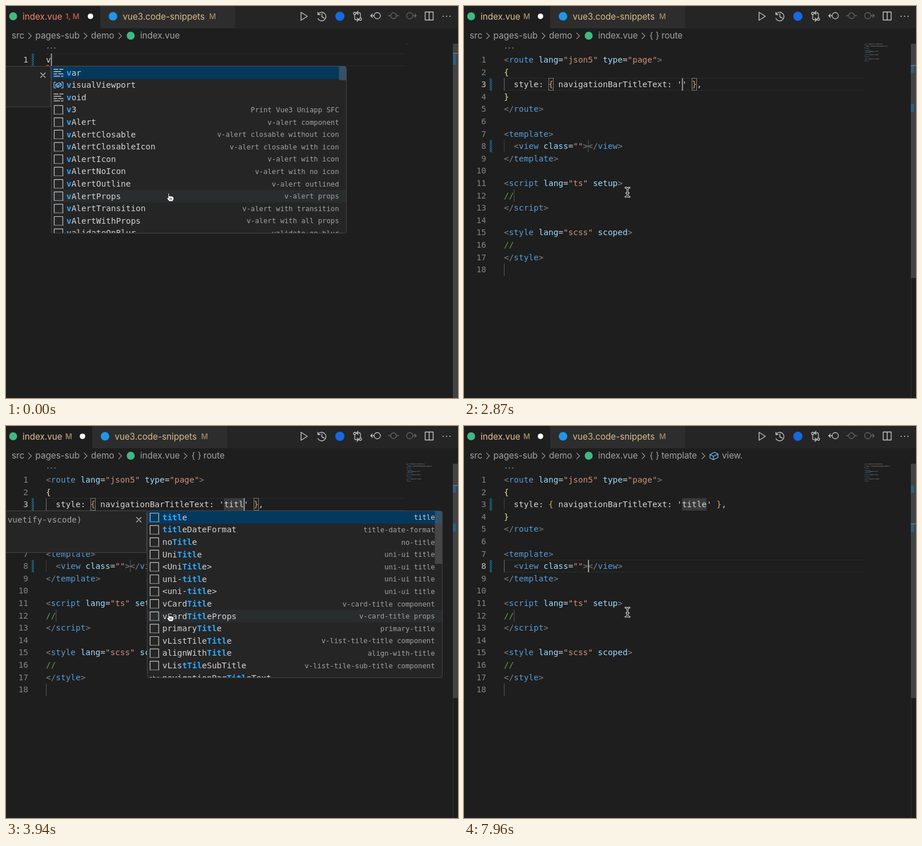
Recreate the animation shown at these times as an HTML page with a canvas. Size 792 px wide and 686 px high, loop 8 s.

```html
<!DOCTYPE html>
<html>
<head>
<meta charset="utf-8">
<style>
html, body { margin: 0; width: 100%; height: 100%; overflow: hidden; background: #1e1e1e; }
canvas { display: block; }
</style>
</head>
<body>
<canvas id="stage" width="792" height="686"></canvas>
<script>
const c = document.getElementById('stage').getContext('2d');
const LOOP = 8000, ROW = 21.6, LEFT = 70, TOP = 83.2;
const MONO = '"DejaVu Sans Mono", "Noto Sans CJK SC", monospace';
const CODE = '14.4px ' + MONO, SMALL = '12.24px ' + MONO;
const UI = '15.2px Inter, sans-serif', BADGE = '500 13px Inter, sans-serif';
const FG = '#d4d4d4', BLUE = '#2aaaff';
c.font = CODE;
const CW = c.measureText('0').width;
const lineTop = n => TOP + (n - 1) * ROW;

// *x* marks the matched letters, | starts the description, a leading #, @ or ~ picks the icon
const LIST_V = ['#*v*ar', '@*v*isualViewport', '#*v*oid', '*v*3|Print Vue3 Uniapp SFC',
  '*v*Alert|v-alert component', '*v*AlertClosable|v-alert closable without icon',
  '*v*AlertClosableIcon|v-alert closable with icon', '*v*AlertIcon|v-alert with icon',
  '*v*AlertNoIcon|v-alert with no icon', '*v*AlertOutline|v-alert outlined',
  '*v*AlertProps|v-alert props', '*v*AlertTransition|v-alert with transition',
  '*v*AlertWithProps|v-alert with all props', '*v*alidateOnBlur|validate-on-blur'];
const UNI = '|uni-app VUE3 平台';
const LIST_V3 = ['*v3*|Print Vue3 Uniapp SFC',
  ...Array(3).fill('*v*ue*3*' + UNI), ...Array(3).fill('platform-*v*ue*3*' + UNI),
  '*v*ListTemplateAvatarWith*3*Lin…|v-list avatar with three lin…'];
const LIST_TI = ['*ti*cks|ticks', '*ti*le|tile', '*ti*meout|timeout', '*ti*tle|title',
  '*ti*tleDateFormat|title-date-format', '*t*otal*I*tems|total-items',
  'v*Ti*mePicker|v-time-picker component', 'v*Ti*mePicker24hFormat|v-time-picker in 24h format',
  'v*Ti*mePickerAllowedTimes|v-time-picker with allowed times …',
  'v*Ti*mePickerColors|v-time-picker with colors option',
  'v*Ti*mePickerInDialog|v-time-picker in dialog', 'v*Ti*mePickerInMenu|v-time-picker in menu',
  'v*Ti*mePickerLandscape|v-time-picker in ladscape mode', 'v*Ti*mePickerProps|v-time-picker props'];
const LIST_TITLE = ['*title*|title', '*title*DateFormat|title-date-format', 'no*Title*|no-title',
  'Uni*Title*|uni-ui title', '<Uni*Title*>|uni-ui title', 'uni-*title*|uni-ui title',
  '<uni-*title*>|uni-ui title', 'vCard*Title*|v-card-title component',
  'vCard*Title*Props|v-card-title props', 'primary*Title*|primary-title',
  'vListTile*Title*|v-list-tile-title component', 'alignWith*Title*|align-with-title',
  'vLis*tTile*SubTitle|v-list-tile-sub-title component', '~navigationBar*Title*Text'];

const BLINK_OFF = [[300, 480], [1020, 1490], [2390, 2870], [4520, 5000], [5520, 6000], [6470, 6950], [7490, 7960]];
const KEYS = [[3410, 't'], [3580, 'ti'], [3700, 'tit'], [3940, 'titl'], [4050, 'title']];

function rect(x, y, w, h, color) { c.fillStyle = color; c.fillRect(x, y, w, h); }
function frame(x, y, w, h, color) { c.strokeStyle = color; c.lineWidth = 1; c.strokeRect(x, y, w, h); }
function disc(x, y, r, color) { c.fillStyle = color; c.beginPath(); c.arc(x, y, r, 0, 7); c.fill(); }
function text(s, x, y, color, font, align = 'left') {
  c.font = font; c.fillStyle = color; c.textAlign = align; c.fillText(s, x, y);
}
function path(d, x, y, color, width = 1.3) {
  c.save(); c.translate(x, y); c.strokeStyle = color; c.lineWidth = width;
  c.lineJoin = c.lineCap = 'round'; c.stroke(new Path2D(d)); c.restore();
}

function topBar(error) {
  rect(0, 0, 792, 39, '#252526');
  const w = error ? 165 : 151, d = w - 165;
  rect(0, 0, w, 39, '#1e1e1e');
  rect(w, 0, 236.5, 39, '#2d2d2d');
  disc(12.5, 18, 7, '#41b883');
  text('index.vue', 29, 23.5, error ? '#f48771' : '#e2c08d', UI);
  text(error ? '1, M' : 'M', 104, 23, error ? '#c25f53' : '#a8916c', BADGE);
  disc(148 + d, 18, 4.8, '#fff');
  disc(187.5 + d, 18, 7.5, '#2196e8');
  text('vue3.code-snippets', 204.5 + d, 23.5, '#dabb8a', UI);
  text('M', 356 + d, 23, '#a08c6c', BADGE);

  const on = '#c5c5c5', dim = '#656565';
  path('M-5-7L6 0L-5 7Z', 522, 18, on, 1.4);
  path('M-7-7V-3H-3M-7-3A7.5 7.5 0 1 1-7 4M0-4V1L4 3', 553.5, 18, on, 1.4);
  disc(585, 18, 8, '#1769e0');
  path('M-5-3V4Q-5 6-3 6H1M-1 3L2 6L-1 9M5 3V-4Q5-6 3-6H-1M1-9L-2-6L1-3M-7-5A2 2 0 1 0-3-5A2 2 0 1 0-7-5M3 5A2 2 0 1 0 7 5A2 2 0 1 0 3 5', 616, 18, on);
  path('M-9 0H-3M-6-3L-9 0L-6 3M-3 0A5.5 5.5 0 1 1 8 0A5.5 5.5 0 1 1-3 0', 648, 17, on);
  path('M-5 0A5 5 0 1 1 5 0A5 5 0 1 1-5 0M-9 0H-5M5 0H9', 679, 17, dim);
  path('M-8 0A5.5 5.5 0 1 1 3 0A5.5 5.5 0 1 1-8 0M3 0H9M6-3L9 0L6 3', 710, 17, dim);
  path('M-7-7H7V7H-7ZM0-7V7', 741.5, 17.5, on, 1.4);
  for (const x of [766, 772, 778]) disc(x, 18, 1.1, on);
}

function breadcrumbs(t) {
  const gray = '#a3a3a3';
  const part = (s, x) => text(s, x, 57.3, gray, UI);
  const sep = x => path('M-2.5-5L2.5 0L-2.5 5', x, 52.3, gray, 1.2);
  part('src', 10); sep(42); part('pages-sub', 51.5); sep(139.5); part('demo', 149); sep(200);
  disc(218.5, 52, 7, '#41b883');
  part('index.vue', 235);
  if (t < 2390) return;
  sep(314.5);
  part('{ }', 325);
  if (t < 6110) return part('route', 346);
  part('template', 346); sep(419.5);
  path('M-7-2L1-6L7-3V3L-1 7L-7 4ZM-7-2L-1 1L7-3M-1 1V7', 438, 52, '#75beff');
  part('view.', 452);
}

// Splits a code line into [text, color] runs
function tokens(s) {
  if (s[0] === '/') return [[s, '#6a9955']];
  if (!s.includes('<')) {
    const brace = s.length > 1 ? '#dfa467' : '#e8dfa2';
    return s.split(/([{}])/).map(p => [p, /[{}]/.test(p) ? brace : FG]);
  }
  let tag = false;
  return s.match(/<\/?|>|"[^"]*"|\w+|=|\s+/g).map(p => {
    let color = '#9cdcfe';
    if (/[<>]/.test(p)) color = '#808080';
    else if (p[0] === '"') color = '#ce9178';
    else if (p === '=') color = FG;
    else if (tag) color = '#569cd6';
    tag = p[0] === '<';
    return [p, color];
  });
}

const codeLines = typed => ['<route lang="json5" type="page">', '{',
  `  style: { navigationBarTitleText: '${typed}' },`, '}', '</route>', '',
  '<template>', '  <view class=""></view>', '</template>', '',
  '<script lang="ts" setup>', '//', '<\/script>', '',
  '<style lang="scss" scoped>', '//', '</style>', ''];

function hatch(n) {
  c.save(); c.beginPath(); c.rect(45, lineTop(n), 4, ROW); c.clip();
  c.strokeStyle = '#1b81a8'; c.lineWidth = 1.3; c.beginPath();
  for (let y = -4; y < 28; y += 3.6) { c.moveTo(44, lineTop(n) + y + 4); c.lineTo(50, lineTop(n) + y - 2); }
  c.stroke(); c.restore();
}

function editor(lines, active, typed, snippet, t) {
  for (const x of [73.5, 79.5, 85.5]) disc(x, 73.5, 1, '#999');
  for (const y of [0, ROW - 0.6]) rect(LEFT, Math.round(lineTop(active) + y), 630, 1, '#2b2b2b');

  if (snippet) {
    rect(LEFT + 36 * CW, lineTop(3), typed.length * CW, ROW, '#3a3a3a');
    for (const n of [3, 8]) rect(LEFT, lineTop(n), 1, ROW, n === active ? '#707070' : '#404040');
    for (const [n, col] of [[8, 17], [12, 2], [18, 0]]) rect(LEFT + col * CW, lineTop(n), 1, ROW, '#575757');
    if (active === 3)
      for (const col of [9, 38 + typed.length]) frame(Math.round(LEFT + col * CW) + .5, 126.5, 8, 21, '#7d7d7d');
  }

  lines.forEach((s, i) => {
    const n = i + 1, y = lineTop(n) + 15.8;
    text(n, 39, y, n === active ? '#c6c6c6' : '#858585', CODE, 'right');
    let x = LEFT;
    for (const [p, color] of snippet ? tokens(s) : [[s, FG]]) {
      text(p, x, y, color, CODE);
      x += p.length * CW;
    }
  });
  for (const n of snippet ? [3, 8] : [1]) hatch(n);

  if (!snippet) {
    let d = 'M0 2';
    for (let x = 3; x <= lines[0].length * CW; x += 3) d += `L${x} ${x % 2 ? 0 : 2}`;
    path(d, LEFT, 103.4, '#f14c4c', 1.1);
  }
  if (!BLINK_OFF.some(([a, b]) => t >= a && t < b)) {
    const col = !snippet ? lines[0].length : active === 8 ? 17 : 36 + typed.length;
    rect(LEFT + col * CW, lineTop(active), 1.7, ROW, '#aeafad');
  }
}

function sideRails(lines, active, snippet) {
  c.globalAlpha = .55;
  lines.forEach((s, i) => {
    let x = 702;
    for (const [p, color] of snippet ? tokens(s) : [[s, FG]])
      for (const ch of p) { if (ch !== ' ') rect(x, 66 + i * 1.87, .8, 1, color); x++; }
  });
  c.globalAlpha = 1;
  rect(783, 66, 1, 620, '#303030');
  rect(783, 66, 9, snippet ? 410 : 620, '#434343');
  const marks = snippet ? [[104, 13], [171, 14]] : [[83, 20]];
  for (const [y, h] of marks) rect(783, y, 5.5, h, '#2d5f80');
  rect(783, active === 8 ? 170.5 : snippet ? 103.5 : 82, 9, 1.5, '#777');
}

function rowIcon(kind, x, y) {
  const color = '#c5c5c5';
  if (kind === '#') path('M-8-6H-1M2-6H8M-8-2H4M-8 2H-3M0 2H8M-8 6H2M5 6H8', x, y, color, 1.5);
  else if (kind === '@') path('M-5-5H-8V5H-5M5-5H8V5H5M-5-1L1-4L5-2V1L-1 4L-5 2ZM-5-1L-1 1L5-2M-1 1V4', x, y, '#75beff', 1.2);
  else if (kind === '~') text('abc', x, y + 4, color, '10px ' + MONO, 'center');
  else {
    path('M-7.5 7V-7.5H7.5V7', x, y, color, 1.2);
    for (let i = -8; i < 8; i += 2.5) rect(x + i, y + 7, 1.5, 1.2, color);
  }
}

function popup(x, y, list, match, hover, thumb) {
  const h = list.length > 8 ? 292 : list.length * ROW + 2.4;
  const edge = new Path2D();
  edge.roundRect(Math.floor(x) + .5, Math.floor(y) + .5, 517, Math.floor(h), 3);
  c.save();
  c.clip(edge);
  rect(x - 1, y - 1, 519, h + 2, '#252526');
  rect(x, y + .7, 517, ROW, '#04395e');
  if (hover) rect(x, y + .7 + hover * ROW, 517, ROW, '#2a2d2e');
  list.forEach((item, i) => {
    const mid = y + 11.5 + i * ROW;
    const kind = /^[#@~]/.test(item) ? item[0] : '';
    const [label, info = ''] = item.slice(kind.length).split('|');
    rowIcon(kind, x + 13, mid);
    let px = x + 27;
    const put = (s, hit) => { text(s, px, mid + 4.8, hit ? BLUE : FG, (hit ? 'bold ' : '') + CODE); px += s.length * CW; };
    label.split('*').forEach((s, k) => {
      if (k % 2) { put(s.slice(0, match), true); put(s.slice(match)); }
      else put(s);
    });
    text(info, x + 504.5, mid + 4.3, i ? '#a3a3a3' : '#d0d0d0', SMALL, 'right');
  });
  if (thumb) rect(x + 504.5, y + .7, 12.5, thumb, 'rgba(121,121,121,.4)');
  c.restore();
  c.strokeStyle = '#454545'; c.lineWidth = 1;
  c.stroke(edge);
}

function details(right, y, h, notes) {
  rect(0, y, right, h, '#252526');
  frame(-1, y + .5, Math.round(right) + .5, h - 1, '#454545');
  path('M-4-4L4 4M4-4L-4 4', right - 14.2, y + 16, '#c5c5c5', 1.2);
  for (const [s, x, ty, color] of notes) text(s, x, ty, color, CODE);
}

function pointer(hand) {
  if (hand) {
    const outline = 'M-4 1V-6Q-3-8-2-6V-1Q-.5-2.5 1-1Q2.5-2 3.5-.5Q5-1 6 1V4L4 8H-2L-6 3Q-7 0-4 2Z';
    c.save(); c.translate(288, 334); c.fillStyle = '#fff'; c.fill(new Path2D(outline)); c.restore();
    path(outline + 'M-.5 2V5M2 2V5', 288, 334, '#111', .9);
  } else {
    const beam = 'M-3.5-8Q0-8 0-5Q0-8 3.5-8M0-5V5M-3.5 8Q0 8 0 5Q0 8 3.5 8M-2 1.5H2';
    path(beam, 286.5, 326, '#fff', 2.8);
    path(beam, 286.5, 326, '#000', 1.1);
  }
}

function draw(t) {
  const snippet = t >= 1910;
  const typed = KEYS.reduce((s, [at, word]) => t >= at ? word : s, '');
  const active = t >= 6000 ? 8 : snippet ? 3 : 1;
  const lines = snippet ? codeLines(typed) : [t < 480 ? 'v' : 'v3'];
  const titleMenu = t >= 3490 && t < 5290;

  rect(0, 0, 792, 686, '#1e1e1e');
  topBar(t < 2090);
  breadcrumbs(t);
  editor(lines, active, typed, snippet, t);
  const railsReady = t >= 2000;
  sideRails(railsReady || !snippet ? lines : ['v3'], railsReady ? active : 1, railsReady);

  if (t < 480) {
    details(79, 105, 72, []);
    popup(79, 105.3, LIST_V, 1, 10, 24);
  } else if (!snippet) {
    details(87.6, 105, 419, [[')', -4.5, 126, '#a3a3a3'], ["'' },", 0, 210, FG]]);
    popup(87.6, 105.3, LIST_V3, 2);
  } else if (titleMenu) {
    details(247, 148, 74, [['(vuetify-vscode)', -6, 169, '#a3a3a3']]);
    if (t < 3700) popup(247, 148.5, LIST_TI, typed.length, 8, 24);
    else popup(247, 148.5, LIST_TITLE, typed.length, 8, 92);
  }
  pointer(t < 480 || titleMenu && t < 5230);
}

(function tick() {
  draw(performance.now() % LOOP);
  requestAnimationFrame(tick);
})();
</script>
</body>
</html>
```
